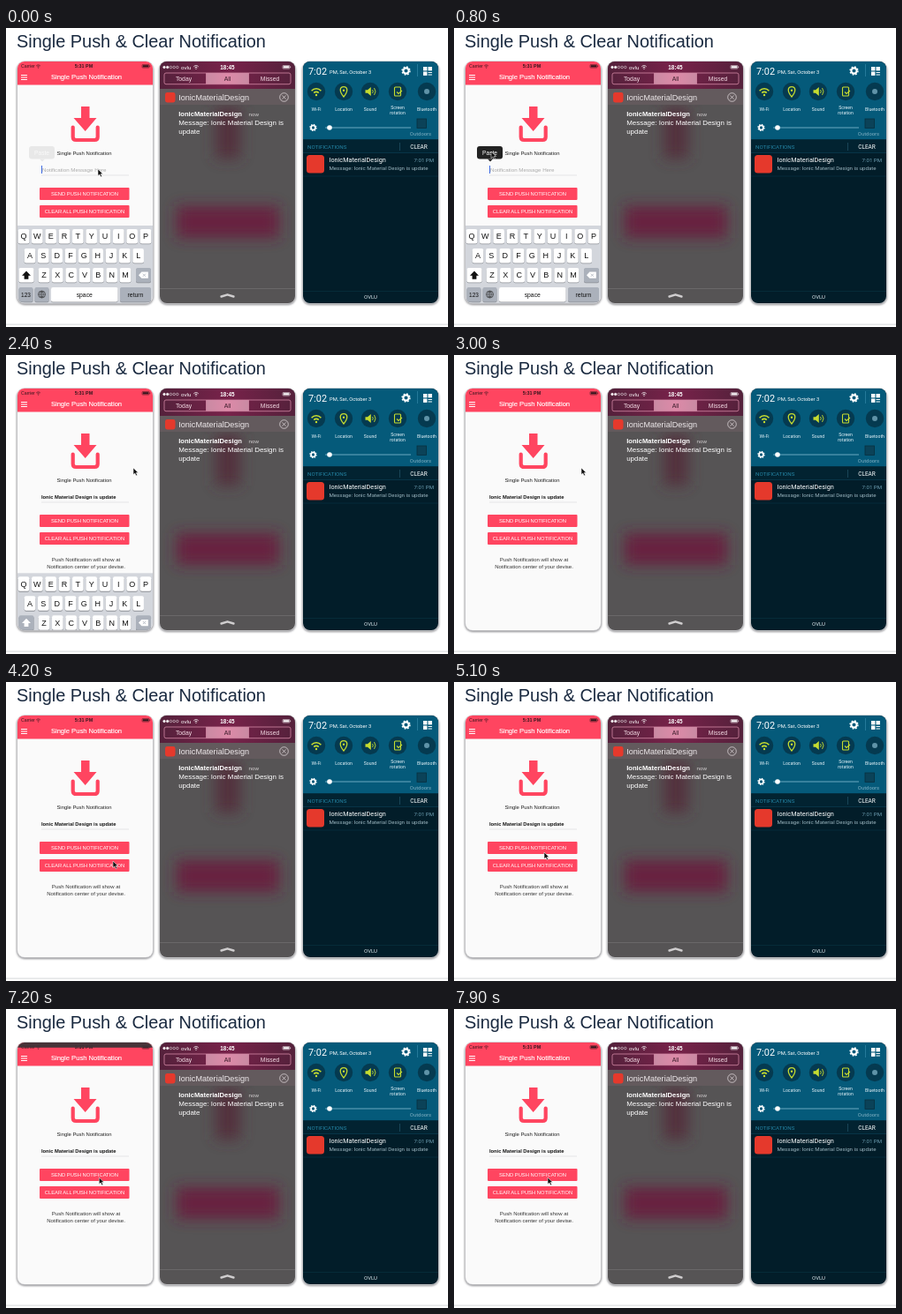
These frames come from a looping animation (500x339 px, 8 s). An HTML page:

```html
<!DOCTYPE html>
<html lang="en">
<head>
<meta charset="utf-8">
<title>Single Push &amp; Clear Notification</title>
<style>
  html, body { margin: 0; width: 100%; height: 100%; overflow: hidden; background: #fff; }
  svg { display: block; width: 100vw; height: 100vh; }
  text { font-family: "Liberation Sans", Arial, sans-serif; }
  .roboto text { font-family: Roboto, sans-serif; }
</style>
</head>
<body>
<svg id="stage" viewBox="0 0 500 339">
  <defs>
    <clipPath id="screen1"><rect x="13" y="38" width="153" height="274" rx="8"/></clipPath>
    <clipPath id="screen2"><rect x="174" y="38" width="153" height="274" rx="8"/></clipPath>
    <clipPath id="screen3"><rect x="336" y="38" width="153" height="274" rx="8"/></clipPath>
    <linearGradient id="plum" x2="1" y2="0">
      <stop offset="0" stop-color="#54213b"/><stop offset=".5" stop-color="#78224a"/><stop offset="1" stop-color="#54213b"/>
    </linearGradient>
    <linearGradient id="tab" x2="1" y2="0">
      <stop offset="0" stop-color="#c98aa3"/><stop offset=".5" stop-color="#dd8aa8"/><stop offset="1" stop-color="#c98aa3"/>
    </linearGradient>
    <filter id="blur" x="-50%" y="-50%" width="200%" height="200%"><feGaussianBlur stdDeviation="8"/></filter>
    <filter id="soft"><feGaussianBlur stdDeviation="1"/></filter>
  </defs>
</svg>
<script>
const LOOP = 8000, STEP = 100;
const PINK = '#ff4560', LIME = '#c6dc30', RED = '#e5392c', NIGHT = '#021d29', DIAL = '#053a50';
const MESSAGE = 'Ionic Material Design is update';
const APP = 'IonicMaterialDesign';
const stage = document.getElementById('stage');

function add(parent, tag, attrs = {}, content) {
  const node = document.createElementNS('http://www.w3.org/2000/svg', tag);
  for (const key in attrs) node.setAttribute(key, attrs[key]);
  if (content !== undefined) node.textContent = content;
  return parent.appendChild(node);
}
const group = (parent, attrs) => add(parent, 'g', attrs);
const rect = (parent, x, y, width, height, fill, more) =>
  add(parent, 'rect', { x, y, width, height, fill, ...more });
const circle = (parent, cx, cy, r, fill, more) =>
  add(parent, 'circle', { cx, cy, r, fill, ...more });
const line = (parent, d, stroke, width = 1, more) =>
  add(parent, 'path', { d, stroke, 'stroke-width': width, fill: 'none', ...more });
const shape = (parent, d, fill) => add(parent, 'path', { d, fill });
const label = (parent, string, x, y, size, fill, more) =>
  add(parent, 'text', { x, y, 'font-size': size, fill, ...more }, string);
const CENTER = { 'text-anchor': 'middle' };
const BOLD = { 'font-weight': 700 };
const ROUND = { 'stroke-linecap': 'round', 'stroke-linejoin': 'round' };

function wifi(parent, x, y, size, color) {
  for (const k of [0.45, 0.9]) {
    const r = size * k, w = r * 0.75;
    line(parent, `M${x - w} ${y - r * 0.66}A${r} ${r} 0 0 1 ${x + w} ${y - r * 0.66}`, color, size * 0.2);
  }
  circle(parent, x, y, size * 0.15, color);
}
function battery(parent, x, y, color) {
  rect(parent, x, y, 8, 3.6, 'none', { stroke: color, 'stroke-width': 0.5, rx: 0.7 });
  rect(parent, x + 0.7, y + 0.7, 6.6, 2.2, color);
  rect(parent, x + 8.5, y + 1.1, 0.6, 1.4, color);
}
function gear(parent, x, y, r) {
  circle(parent, x, y, r * 0.62, 'none', { stroke: '#fff', 'stroke-width': r * 0.42 });
  circle(parent, x, y, r * 0.9, 'none', {
    stroke: '#fff', 'stroke-width': r * 0.28, 'stroke-dasharray': r * 0.9 * Math.PI / 8
  });
}
// A phone screen with a soft shadow and a thin rim
function phone(x, fill, id, attrs) {
  rect(stage, x - 1, 39, 155, 275, '#8e8e92', { rx: 9, filter: 'url(#soft)' });
  rect(stage, x - 0.7, 37.3, 154.4, 275.4, '#c9c9cc', { rx: 8.7 });
  const screen = group(stage, { 'clip-path': `url(#${id})`, ...attrs });
  rect(screen, x, 38, 153, 275, fill);
  return screen;
}

label(stage, 'Single Push & Clear Notification', 12, 21.5, 19.9, '#1a2a40');
rect(stage, 0, 335.5, 500, 1.2, '#dcdddf');

// Left phone: the form
const form = phone(13, '#fafafa', 'screen1');
rect(form, 13, 38, 153, 26.5, PINK);
label(form, 'Single Push Notification', 91, 58.4, 7.6, '#fff', { ...CENTER, stroke: '#fff', 'stroke-width': 0.15 });
line(form, 'M17 53.5h7M17 56h7M17 58.5h7', '#fff', 1);
shape(form, 'M85 89h9.500v13h8L89.700 117 76.500 102H85z', PINK);
line(form, 'M75.700 112.500v11q0 3.500 3.500 3.500h21q3.500 0 3.500-3.500v-11', PINK, 4.2, ROUND);
label(form, 'Single Push Notification', 88.5, 144, 5.9, '#222', CENTER);
line(form, 'M40 167h99', '#dcdcde', 0.7);
const hint = label(form, 'Notification Message Here', 41, 163.2, 6.2, '#aaa');
const typed = label(form, MESSAGE, 40, 163, 5.75, '#111', BOLD);
const caret = rect(form, 40, 156, 1, 9, '#3f6be0');
for (const [y, string] of [[181, 'SEND PUSH NOTIFICATION'], [201, 'CLEAR ALL PUSH NOTIFICATION']]) {
  rect(form, 38, y, 101.5, 14, PINK, { rx: 1 });
  label(form, string, 89, y + 8.9, 5.8, '#fff', CENTER);
}
label(form, 'Push Notification will show at', 90.5, 234, 6, '#333', CENTER);
label(form, 'Notification center of your devise.', 90.5, 241.5, 6, '#333', CENTER);

// Keyboard
const keyboard = group(form);
rect(keyboard, 13, 224, 153, 89, '#d3d6dc');
function key(x, y, width, fill, string, size = 9) {
  rect(keyboard, x, y + 0.8, width, 16.5, '#8d9096', { rx: 2 });
  const cap = rect(keyboard, x, y, width, 16.5, fill, { rx: 2 });
  if (string) label(keyboard, string, x + width / 2, y + 8.2 + size * 0.36, size, '#111', CENTER);
  return cap;
}
[['QWERTYUIOP', 20], ['ASDFGHJKL', 27], ['ZXCVBNM', 43]].forEach(([letters, x], row) =>
  [...letters].forEach((letter, i) => key(x + i * 15.33 - 6.3, 228 + row * 22, 12.6, '#fff', letter)));
const GRAY = '#abb1bb';
const shift = key(14.5, 272, 17, GRAY);
const shiftArrow = shape(keyboard, 'M23 275.5l5 5.2h-2.6v4h-4.8v-4H18z', '#fff');
key(147, 272, 17, GRAY);
shape(keyboard, 'M150 280.2l3.4-3.6h7.4v7.2h-7.4z', '#fff');
line(keyboard, 'M154.8 278.6l3.2 3.2m0-3.2l-3.2 3.2', GRAY, 0.8);
key(14.5, 294, 16, GRAY, '123', 6.5);
key(32.5, 294, 16, GRAY);
circle(keyboard, 40.5, 302, 4, 'none', { stroke: '#333', 'stroke-width': 0.7 });
line(keyboard, 'M36.5 302h8M40.5 298v8M38 299q2.5 1.6 5 0M38 305q2.5-1.6 5 0M40.5 298q-4 4 0 8q4-4 0-8', '#333', 0.5);
key(51, 294, 75.5, '#fff', 'space', 6.8);
key(129, 294, 35, GRAY, 'return', 6.8);

// Paste callout
const callout = group(form);
rect(callout, 26, 134, 29, 14.5, '#222', { rx: 3 });
shape(callout, 'M38 148.4h6l-3 3z', '#222');
label(callout, 'Paste', 40.5, 143.6, 6.6, '#fff', CENTER);

const status = group(form);
label(status, 'Carrier', 17, 45.2, 5.2, '#33161d');
wifi(status, 36.5, 45, 3.4, '#33161d');
label(status, '5:31 PM', 88, 45.4, 5.4, '#33161d', { ...CENTER, ...BOLD });
battery(status, 154, 41.5, '#33161d');

// Incoming banner
const banner = group(form);
rect(banner, 13, 38, 153, 26.5, '#3f3337', { opacity: 0.95 });
label(banner, `Message: ${MESSAGE}`, 33, 52.1, 6.05, '#fff');

// Middle phone: notification centre
const center = phone(174, '#565455', 'screen2');
const glow = group(center, { filter: 'url(#blur)' });
rect(glow, 237, 90, 28, 58, '#53303e');
rect(glow, 193, 202, 116, 36, '#67203f');
rect(center, 174, 38, 153, 31, 'url(#plum)');
rect(center, 174, 69, 153, 18, '#635a5d');
for (let i = 0; i < 5; i++)
  circle(center, 179 + i * 3.7, 44.5, 1.3, i < 2 ? '#fff' : 'none', { stroke: '#fff', 'stroke-width': 0.5 });
label(center, 'ovlu', 198, 46.8, 6.2, '#fff');
wifi(center, 215, 46.2, 4, '#fff');
label(center, '18:45', 250.5, 47, 6.4, '#fff', { ...CENTER, ...BOLD });
battery(center, 313, 42.5, '#fff');
rect(center, 226.5, 51, 48, 12.7, 'url(#tab)');
rect(center, 179, 51, 143, 12.7, 'none', { rx: 2, stroke: '#d489a5', 'stroke-width': 0.8 });
line(center, 'M226.5 51v12.7M274.5 51v12.7', '#d489a5', 0.8);
label(center, 'Today', 201, 59.8, 6.8, '#f3dbe4', CENTER);
label(center, 'All', 250.5, 59.8, 6.8, '#3b1c2a', CENTER);
label(center, 'Missed', 298.5, 59.8, 6.8, '#f3dbe4', CENTER);
rect(center, 180, 73, 11.5, 11.5, RED, { rx: 2.4 });
label(center, APP, 195.2, 82, 9.1, '#efeaec');
circle(center, 314.5, 78.5, 4.8, 'none', { stroke: '#ece6e8', 'stroke-width': 0.7 });
line(center, 'M312.5 76.5l4 4m0-4l-4 4', '#ece6e8', 0.7);
label(center, APP, 195.2, 100.2, 7.6, '#fff', BOLD);
label(center, 'now', 274.5, 100.2, 6.2, '#d5d2d3');
label(center, 'Message: Ionic Material Design is', 195.2, 109.9, 7.95, '#fff');
label(center, 'update', 195.2, 119.8, 7.95, '#fff');
line(center, 'M174 295.5h153', '#787677', 0.6);
line(center, 'M243.5 304.5l7-2.2 7 2.2', '#cfcdce', 2.4, ROUND);

// Right phone: quick settings
const shade = phone(336, NIGHT, 'screen3', { class: 'roboto' });
rect(shade, 336, 38, 153, 88.5, '#055a7a');
label(shade, '7:02', 342, 52.5, 10.9, '#fff');
label(shade, 'PM, Sat, October 3', 366, 52.3, 5.75, '#fff');
gear(shade, 452.5, 48.5, 5);
line(shade, 'M465.5 41v14', '#3b8fb0', 0.6);
for (const [x, y] of [[472, 44], [477.5, 44], [472, 49.5]]) rect(shade, x, y, 4.4, 4.4, '#fff');
line(shade, 'M477.5 50.5h4.4M477.5 53h4.4', '#fff', 1.1);

const toggles = [[351, ['Wi-Fi']], [382, ['Location']], [412, ['Sound']], [443, ['Screen', 'rotation']], [476, ['Bluetooth']]];
for (const [x, words] of toggles) {
  circle(shade, x, 72, 10.2, DIAL);
  words.forEach((word, row) =>
    label(shade, word, x, (words.length > 1 ? 91.8 : 94) + row * 6.2, 5.1, '#e9f5fa', CENTER));
}
wifi(shade, 351, 76, 8, LIME);
line(shade, 'M382 78c-5.500-6.500-4.500-11.300 0-11.300s5.500 4.800 0 11.300z', LIME, 1.3);
circle(shade, 382, 70.7, 1.2, LIME);
shape(shade, 'M406.5 70.3h2.5l3.800-3.300v10l-3.800-3.300h-2.500z', LIME);
line(shade, 'M414.5 70q1.6 2 0 4M416.5 68q3 4 0 8', LIME, 0.9);
rect(shade, 439.5, 67, 7, 10, 'none', { stroke: LIME, 'stroke-width': 1.1, rx: 1 });
line(shade, 'M442 72.5l2 2 4-3.500', LIME, 1.1);
circle(shade, 476, 72, 3, '#5f93a8');

gear(shade, 347.5, 113, 4);
line(shade, 'M361 113h97', '#6aa8c0', 1.1);
circle(shade, 366, 113, 2.8, '#fff');
rect(shade, 465, 103, 10.5, 10.5, '#0b4258', { stroke: '#08303f', 'stroke-width': 0.8 });
label(shade, 'Outdoors', 469, 122, 5.9, '#7fafc2', CENTER);
rect(shade, 336, 126.5, 153, 15, '#022331');
label(shade, 'NOTIFICATIONS', 341, 137, 6.2, '#2586a6');
label(shade, 'CLEAR', 467, 137.2, 6.5, '#fff', CENTER);
line(shade, 'M445.5 130v9', '#2a5f74', 0.6);
line(shade, 'M336 141.5h153', '#0c4459', 0.6);
rect(shade, 340, 144, 20, 20.5, RED, { rx: 3.5 });
label(shade, APP, 365.5, 152.4, 7.25, '#fff');
label(shade, '7:01 PM', 484, 152.2, 6.1, '#6f9fb3', { 'text-anchor': 'end' });
label(shade, `Message: ${MESSAGE}`, 365.5, 161.2, 6.15, '#9eb7c1');
line(shade, 'M336 168h153', '#083546', 0.6);
line(shade, 'M336 298.5h153', '#0a3444', 0.6);
label(shade, 'OVLU', 412.5, 306.8, 6, '#dbe7ec', CENTER);

const cursor = add(stage, 'path', {
  d: 'M0 0v7.6l1.8-1.6 1.3 2.8 1.4-.6-1.3-2.7h2.4z',
  fill: '#111', stroke: '#fff', 'stroke-width': 0.5
});

const path = [
  [0, 104, 160], [200, 104, 160], [800, 42, 140], [1300, 42, 140], [1600, 86, 140],
  [2100, 144, 128], [3300, 144, 128], [4000, 121, 203], [4500, 121, 203],
  [5100, 102, 193], [5500, 105, 191], [6800, 105, 191], [7900, 106, 191]
];
const clamp = v => Math.max(0, Math.min(1, v));
const progress = (t, from, to) => clamp((t - from) / (to - from));
const smooth = p => p * p * (3 - 2 * p);

function cursorAt(t) {
  const i = path.findIndex(point => point[0] > t);
  if (i < 0) return path[path.length - 1].slice(1);
  const [from, x, y] = path[i - 1], [to, nextX, nextY] = path[i];
  const p = smooth(progress(t, from, to));
  return [x + (nextX - x) * p, y + (nextY - y) * p];
}
const show = (node, visible) => node.setAttribute('visibility', visible ? 'visible' : 'hidden');

function render(t) {
  const pasted = t >= 1300;
  show(hint, !pasted);
  show(typed, pasted);
  show(caret, t < 2300);
  caret.setAttribute('x', pasted ? 122.5 : 40);
  shift.setAttribute('fill', pasted ? GRAY : '#fff');
  shiftArrow.setAttribute('fill', pasted ? '#fff' : '#111');
  callout.setAttribute('opacity', Math.min(clamp(0.08 + t / 250), 1 - progress(t, 1300, 1630)));
  keyboard.setAttribute('transform', `translate(0 ${90 * smooth(progress(t, 2300, 2600))})`);
  const drop = smooth(progress(t, 5700, 6000)) - smooth(progress(t, 7000, 7300));
  banner.setAttribute('transform', `translate(0 ${-28 * (1 - drop)})`);
  cursor.setAttribute('transform', `translate(${cursorAt(t)})`);
}

const start = performance.now();
function tick() {
  const t = (performance.now() - start) % LOOP;
  render(Math.floor(t / STEP) * STEP);
  requestAnimationFrame(tick);
}
render(0);
requestAnimationFrame(tick);
</script>
</body>
</html>
```
